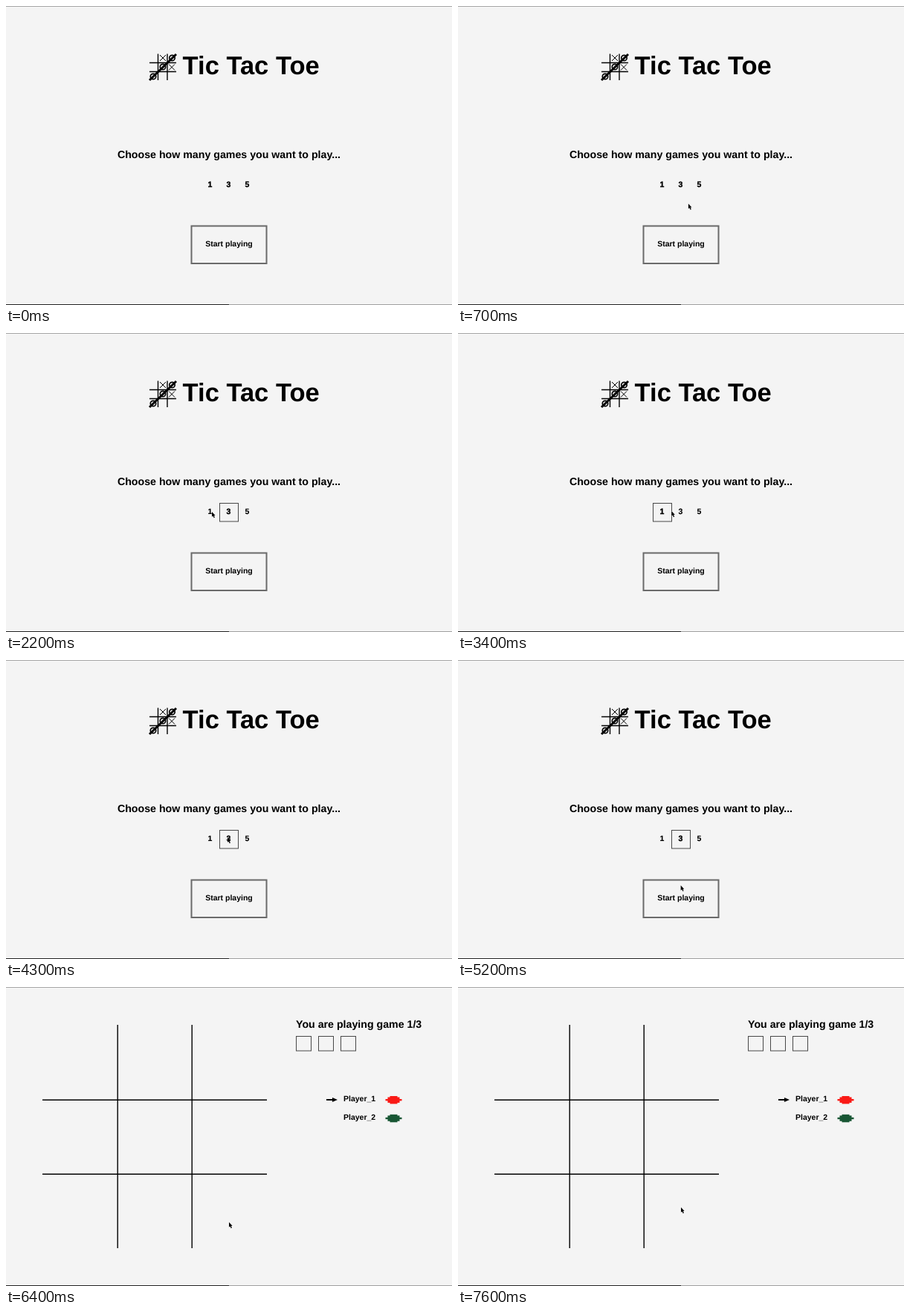
Animation of 600x403 px, one loop 8 s. Source, as an HTML page:

```html
<!DOCTYPE html>
<html lang="en">
<head>
<meta charset="utf-8">
<title>Tic Tac Toe</title>
<style>
  html, body { margin: 0; width: 100%; height: 100%; overflow: hidden; background: #f4f4f4; }
  svg { display: block; width: 100vw; height: 100vh; }
  text { font: bold 10.5px "Liberation Sans", Arial, sans-serif; text-rendering: geometricPrecision; }
  .title { font-size: 34.5px; }
  .head { font-size: 14.2px; }
  .mid { text-anchor: middle; }
  .line { fill: none; stroke: #000; stroke-width: 1.4; }
  .box { fill: none; stroke: #484848; }
</style>
</head>
<body>
<svg viewBox="0 0 600 403">
  <defs>
    <path id="x" d="M-4-4 4 4M4-4-4 4" stroke="#000"/>
    <circle id="o" r="3.7" fill="none" stroke="#000" stroke-width="1.7"/>
    <rect id="score" class="box" x=".5" y=".5" width="20" height="19.5"/>
    <g id="chip">
      <rect x="-5" y="-5.2" width="10" height="10.5"/>
      <rect x="-8" y="-3.7" width="16" height="7.5"/>
      <rect x="-11" y="-1.2" width="22" height="2.4"/>
    </g>
  </defs>
  <rect width="600" height="403" fill="#f4f4f4"/>
  <rect width="600" height="1" fill="#a6a6a6"/>
  <rect y="402" width="600" height="1" fill="#a0a0a0"/>
  <rect y="402" width="300" height="1" fill="#222"/>

  <g id="menu">
    <path class="line" d="M204.5 64.5V100M217 64.5V100M193 76.5H229M193 88.5H229"/>
    <use href="#x" x="211" y="70"/><use href="#x" x="223" y="82.5"/>
    <use href="#o" x="223.5" y="70"/><use href="#o" x="211" y="82"/><use href="#o" x="198" y="95"/>
    <path d="M193 100 229 65" stroke="#000" stroke-width="3"/>
    <text x="237.6" y="91.6" class="title">Tic Tac Toe</text>
    <text x="300" y="205" class="mid head">Choose how many games you want to play...</text>
    <g id="digits" class="mid" stroke="#000">
      <text x="274.5" y="244.2">1</text>
      <text x="299.5" y="244.2">3</text>
      <text x="324.5" y="244.2">5</text>
    </g>
    <rect id="pick" class="box" y="229.5" width="25" height="24.5"/>
    <rect x="249.5" y="296.5" width="101" height="50.5" fill="none" stroke="#6a6a6a" stroke-width="2"/>
    <text x="300" y="324.3" class="mid">Start playing</text>
  </g>

  <g id="game">
    <path class="line" d="M150.2 51V352M250.2 51V352M49 152.2H351M49 252.2H351"/>
    <text x="390" y="54.7" class="head">You are playing game 1/3</text>
    <use href="#score" x="390" y="66"/><use href="#score" x="420" y="66"/><use href="#score" x="450" y="66"/>
    <path d="M431 151h8v-2l7 3-7 3v-2h-8z"/>
    <text x="454" y="154.2">Player_1</text>
    <text x="454" y="179.2">Player_2</text>
    <use href="#chip" x="521.5" y="152.2" fill="#fa1a16"/>
    <use href="#chip" x="521.5" y="177" fill="#185634"/>
  </g>

  <path id="cursor" d="M0 0V6.8L1.5 5.5 2.7 8.2 3.9 7.6 2.8 5H4.6Z" stroke="#f4f4f4" stroke-width=".6" paint-order="stroke"/>
</svg>
<script>
const LOOP = 8000, STEP = 100, ENTER = 200, HOVER = 1100, PLAY = 6400;
const el = id => document.getElementById(id);
const show = (id, on) => el(id).setAttribute("visibility", on ? "visible" : "hidden");
const easeOut = u => 1 - (1 - u) ** 3;

// Each glide goes from the previous resting place to a new one
const glides = [
  { at: ENTER, ms: 1100, x: 300, y: 242 },
  { at: 1800, ms: 400, x: 277, y: 241 },
  { at: 3300, ms: 500, x: 298, y: 239 },
  { at: 4800, ms: 900, x: 300, y: 317 },
  { at: 6800, ms: 400, x: 281, y: 306 },
  { at: 7200, ms: 400, x: 300, y: 297 }
];
const clicks = [{ at: 1500, digit: 3 }, { at: 2600, digit: 1 }, { at: 4100, digit: 3 }];

function pointer(t) {
  let x = 361, y = 393;
  for (const g of glides) {
    const k = easeOut(Math.min(1, Math.max(0, (t - g.at) / g.ms)));
    x += (g.x - x) * k;
    y += (g.y - y) * k;
  }
  return [x, y];
}

// The old box is wiped one step before the new one is drawn
function chosen(t) {
  if (clicks.some(c => c.at === t + STEP)) return 0;
  return clicks.findLast(c => c.at <= t)?.digit || 0;
}

function draw(now) {
  const t = Math.floor(now % LOOP / STEP) * STEP;
  const digit = chosen(t);
  show("menu", t < PLAY);
  show("game", t >= PLAY);
  show("pick", digit && t < PLAY);
  show("cursor", t >= ENTER);
  el("pick").setAttribute("x", 250 + 12.5 * digit);
  for (const d of el("digits").children)
    d.setAttribute("stroke-width", t < HOVER || +d.textContent === digit ? .35 : .1);
  el("cursor").setAttribute("transform", `translate(${pointer(t)})`);
}

let start;
function tick(now) {
  start ??= now;
  draw(now - start);
  requestAnimationFrame(tick);
}
draw(0);
requestAnimationFrame(tick);
</script>
</body>
</html>
```
